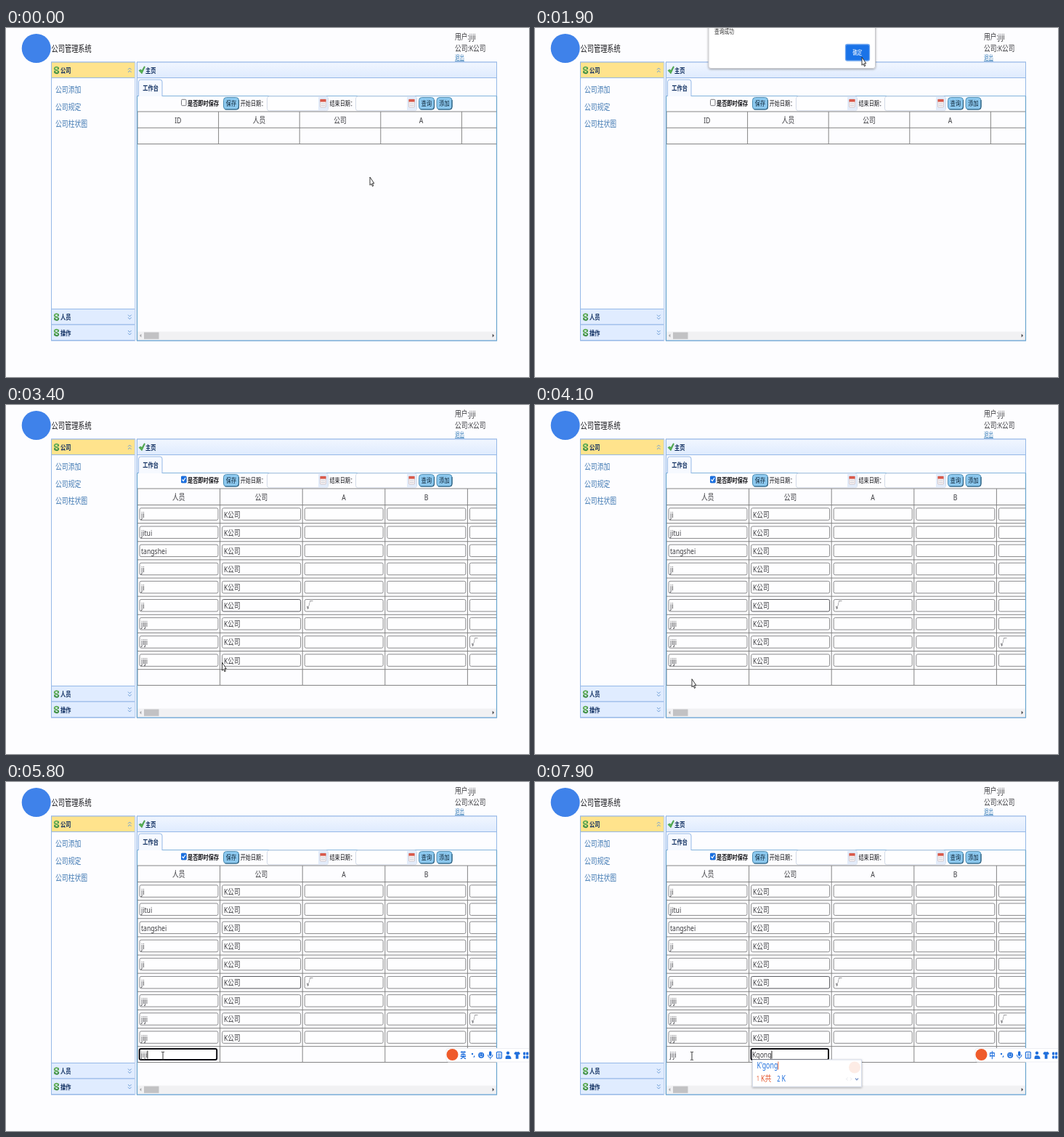
Animation, 720 px wide and 480 px high, one loop 8 s. Source, as an HTML page:

```html
<!DOCTYPE html>
<html lang="zh">
<head>
<meta charset="utf-8">
<style>
html, body { margin: 0; width: 100%; height: 100%; overflow: hidden; background: #fdfdff; }
svg { display: block; width: 720px; height: 480px; }
text { font-family: "Noto Sans", "Noto Sans CJK SC", sans-serif; white-space: pre; }
</style>
</head>
<body>
<svg id="stage" viewBox="0 0 720 480" xmlns="http://www.w3.org/2000/svg"></svg>
<script>
const LOOP = 8000;
const SQUEEZE = 0.75;
const INK = '#3c3c40', BLUE = '#1f6fdc', EDGE = '#95b8e7', LINE = '#858585';

const rect = (x, y, w, h, fill, stroke = 'none', more = '') =>
  `<rect x="${x}" y="${y}" width="${w}" height="${h}" fill="${fill}" stroke="${stroke}" ${more}/>`;
const path = (d, stroke, width = 1, fill = 'none', more = '') =>
  `<path d="${d}" stroke="${stroke}" stroke-width="${width}" fill="${fill}" ${more}/>`;
const group = (id, body, more = '') => `<g id="${id}" ${more}>${body}</g>`;
const circle = (x, y, r, fill) => `<circle cx="${x}" cy="${y}" r="${r}" fill="${fill}"/>`;

// y is the middle of the line of text
const text = (x, y, s, size, fill = INK, more = '') =>
  `<text transform="translate(${x} ${y + size * 0.37}) scale(${SQUEEZE} 1)" font-size="${size}" fill="${fill}" ${more}>${s}</text>`;
const bold = (x, y, s, size, fill) => text(x, y, s, size, fill, 'font-weight="700"');
const centred = (x, y, s, size, fill) => text(x, y, s, size, fill, 'text-anchor="middle"');

function chevrons(x, y, dir) {
  const one = dy => `M${x - 2.3} ${y + dy + 1.2 * dir}l2.3 ${-2.4 * dir}l2.3 ${2.4 * dir}`;
  return path(one(-1.8) + one(1.8), '#6f9fd8', 1);
}

function cycleIcon(x, y) {
  return path(`M${x + 2.8} ${y - 2.6}C${x} ${y - 6} ${x - 4} ${y - 3} ${x - 2.4} ${y - 1}L${x + 2.4} ${y + 1.6}`, '#5cab52', 1.9) +
    path(`M${x - 2.8} ${y + 2.6}C${x} ${y + 6} ${x + 4} ${y + 4} ${x + 2.4} ${y + 1.4}`, '#3f8f45', 1.9) +
    path(`M${x + 3.4} ${y - 4.4}v3.6h-3z M${x - 3.4} ${y + 4.6}v-3.6h3z`, 'none', 0, '#4b9a4b');
}

function sideHead(y, label, open) {
  return rect(62.5, y, 115, 21.5, open ? '#ffe38c' : '#e0ecff', EDGE) +
    cycleIcon(69.5, y + 10.8) + bold(75, y + 11, label, 9.6, '#0e2d5f') +
    chevrons(170.3, y + 11, open ? 1 : -1);
}

function button(x, label) {
  return rect(x, 95.5, 21, 16.5, '#8cc8ee', '#4f8fb5', 'rx="4"') +
    path(`M${x + 2} 112h15.5q3.5 0 3.5 -4v-9`, '#2d5f7e', 1.2) +
    centred(x + 10.4, 103.8, label, 9.5, '#10283c');
}

function dateBox(x) {
  return rect(x, 94, 84, 19.8, '#fefeff', '#d3dbe8', 'rx="3"') +
    rect(x + 70.5, 94.5, 13, 18.8, '#e3ecfa') +
    rect(x + 73, 98, 8, 11, '#f7f3f4', '#c9b9bd', 'stroke-width=".7" rx="1"') +
    rect(x + 73, 98, 8, 3.6, '#d9594a') +
    path(`M${x + 74.5} 104h5M${x + 74.5} 106.5h5`, '#b9bcc8', 1, 'none', 'stroke-dasharray="1.2 .7"');
}

function grid(xs, ys, heads) {
  const left = xs[0], bottom = ys[ys.length - 1];
  const d = ys.map(y => `M${left} ${y}H676`).join('') + xs.map(x => `M${x} 115V${bottom}`).join('');
  const step = xs[1] - xs[0];
  return path(d, LINE) + heads.map((h, i) => centred(left + step * (i + 0.5), 126.7, h, 11.6)).join('');
}

const field = (x, y, stroke = '#8a8a8c') => rect(x, y, 108, 16.5, '#fefeff', stroke, 'rx="2"');
const focusBox = x => rect(x, 367, 106.5, 15, '#fff', '#0d0d12', 'stroke-width="2" rx="2"');

const people = ['ji', 'jitui', 'tangshei', 'ji', 'ji', 'ji', 'jiji', 'jiji', 'jiji'];
const COL = 113.6, ROW = 25.13;

function fullTable() {
  const ys = [115, ...Array.from({ length: 10 }, (_, i) => 137.5 + i * ROW), 385.5];
  const xs = [0, 1, 2, 3, 4].map(i => 181 + i * COL);
  let out = grid(xs, ys, ['人员', '公司', 'A', 'B']);
  people.forEach((name, r) => {
    const y = 141.8 + r * ROW, mid = y + 8.5;
    for (let c = 0; c < 5; c++) out += field(184 + c * COL, y, r === 5 && c === 1 ? '#55555a' : undefined);
    out += text(186, mid, name, 11.5) + text(300, mid, 'K公司', 11.5);
    if (r === 5) out += text(413.5, mid, '√', 12);
    if (r === 7) out += text(640.5, mid, '√', 12);
  });
  return out;
}

function inputBar() {
  const icons =
    circle(642, 374, 1.2, BLUE) + path('M645 376.5l-1 2.2', BLUE, 1.3) +
    circle(654.2, 375.7, 4, BLUE) + path('M652 376.4q2.2 3 4.4 0', '#fff', 1) +
    circle(652.8, 374.2, 0.7, '#fff') + circle(655.6, 374.2, 0.7, '#fff') +
    rect(665, 370.3, 3.4, 6.6, BLUE, 'none', 'rx="1.7"') +
    path('M663.4 375q0 4 3.3 4t3.3 -4M666.7 379v2.4', BLUE, 1) +
    rect(675.4, 371.3, 7, 8.8, 'none', BLUE, 'stroke-width="1.2" rx="1"') +
    path('M677 374h4M677 376h4M677 378.2h4', BLUE, 0.9) +
    circle(691, 372.8, 2.2, BLUE) + path('M687.6 381v-2q0 -3 3.4 -3t4.4 3v2z', 'none', 0, BLUE) +
    path('M699.3 373l2.6 -2.3q1.7 1.6 3.4 0l2.6 2.3l-1.4 2.2l-1 -.6v6.2h-3.8v-6.2l-1 .6z', 'none', 0, BLUE) +
    [712, 716].map(x => [371.5, 376.4].map(y => rect(x, y, 3.2, 4, BLUE, 'none', 'rx="1"')).join('')).join('');
  return rect(606, 366.5, 116, 18.5, '#fff', '#eceef3', 'rx="3"') + circle(614.5, 375, 8, '#ef5b2b') +
    `<g id="mode">${text(625.3, 375.7, '中', 11, BLUE, 'font-weight="700"')}</g>` + icons;
}

const shadow = 'filter="url(#soft)"';
const stage = document.getElementById('stage');
stage.innerHTML = `
<defs>
  <linearGradient id="head" x2="0" y2="1"><stop stop-color="#f1f6ff"/><stop offset="1" stop-color="#dfebfe"/></linearGradient>
  <filter id="soft" x="-10%" y="-20%" width="120%" height="150%"><feDropShadow dx="0" dy="1" stdDeviation="1.5" flood-opacity=".35"/></filter>
  <clipPath id="pane"><rect x="180" y="93" width="495.5" height="324"/></clipPath>
</defs>` +
  rect(0, 0, 720, 480, '#fdfdff') +
  circle(41.7, 28, 20, '#3f82ea') +
  text(62.5, 28.7, '公司管理系统', 12.3, '#1c1c20', 'font-weight="500"') +
  text(618, 12, '用户:jiji', 11.6) + text(618, 27.8, '公司:K公司', 11.6) +
  text(618, 41, '退出', 8.6, '#337ab7') + path('M618 45.5h13', '#337ab7', 0.7) +
  rect(62.5, 47, 115, 383, '#fdfdff', EDGE) +
  sideHead(47, '公司', true) + sideHead(386.5, '人员') + sideHead(408, '操作') +
  ['公司添加', '公司规定', '公司柱状图'].map((s, i) => text(68, 84.5 + i * 23.8, s, 11.8, '#4179b3')).join('') +
  rect(177.5, 47, 3, 383, '#e6eefb') +
  rect(180.5, 47, 495, 383, '#fdfdff', EDGE) +
  rect(180.5, 47, 495, 21.5, 'url(#head)', EDGE) +
  path('M183 58.5l2.6 -1.5l1.2 2l3.6 -6.2l1 .6l-4.4 9.4z', '#3c9440', 0.7, '#58b34f') +
  bold(192, 58, '主页', 9.6, '#0e2d5f') +
  path('M181 93.5H675', '#82b4dc', 1) +
  path('M182.5 94V74q0 -3 3 -3h26.500q3 0 3 3v20', EDGE, 1, '#f6f9ff') +
  bold(188.3, 82, '工作台', 9.6, '#0e2d5f') +
  rect(241.5, 98.300, 6.5, 8.4, '#fff', '#77777c', 'rx="1.2"') +
  group('tick', rect(241, 97.8, 7.5, 9.4, '#1a6fe0', 'none', 'rx="1.2"') + path('M242.5 102.5l1.700 2l2.800 -4.500', '#fff', 1.2)) +
  bold(250, 103.5, '是否即时保存', 9.6, '#17171b') +
  button(299.5, '保存') + text(322.7, 103.5, '开始日期：', 9.5, '#17171b') + dateBox(359.5) +
  text(445.5, 103.5, '结束日期：', 9.5, '#17171b') + dateBox(481.5) +
  button(568.5, '查询') + button(593, '添加') +
  group('empty', grid([0, 1, 2, 3, 4].map(i => 181 + i * 111.6), [115, 137.300, 159.500], ['ID', '人员', '公司', 'A']), 'clip-path="url(#pane)"') +
  group('full', fullTable(), 'clip-path="url(#pane)"') +
  rect(181, 417.5, 494.5, 11.5, '#f1f1f3') + rect(190, 418.5, 20.500, 9.300, '#c2c2c4') +
  path('M186.300 420.800v4.600l-2.300 -2.300z', 'none', 0, '#a5a5a8') +
  path('M669.700 420.800v4.600l2.300 -2.300z', 'none', 0, '#404044') +
  path('M180.5 93.500V430H675.5V93.500', '#69a5ce', 1.200) +
  group('box1', focusBox(183.7)) + group('box2', focusBox(297.5)) +
  group('name', '') + group('firm', '') +
  group('caret', path('M0 369.5v11', '#111', 0.9)) +
  group('hint', rect(183.5, 386.5, 106.5, 32.500, '#fff', 'none', shadow) + text(190, 400.800, '人员1', 9.3, '#222')) +
  group('bar', inputBar()) +
  group('ime', rect(299.5, 382, 150, 37, '#fff', '#d5dcea', shadow) + circle(440, 392.5, 8, '#fdece5') +
    path('M430.500 406.500l-2 2l2 2M434 406.500l2 2l-2 2', '#e3e5ea', 0.9) +
    path('M441 407.500l2 2.300l2 -2.300', '#7795c9', 1.2) + '<g id="words"></g>') +
  group('alert', rect(239, -10, 229.500, 65.500, '#fff', '#c8c8cc', 'rx="3" ' + shadow) +
    text(247, 5, '查询成功', 9, '#333') +
    rect(427.500, 22.500, 33, 22.500, '#1a73e8', '#6fa6ef', 'rx="2.500" stroke-width="1.300"') +
    centred(443.800, 34, '确定', 8.8, '#fff')) +
  group('arrow', path('M0 0V11.200L2 9.300L3.500 12.800L4.800 12L3.400 8.700H5.800Z', '#222', 0.9, '#fff')) +
  group('hand', path('M0 .8q.8 -1.300 1.600 0v5l3.600 1q1.200 .6 1 2.200l-.7 5h-4.200l-2.600 -4.600q-.6 -1.800 .6 -1.200l.7 .8z', '#222', 0.9, '#fff')) +
  group('beam', path('M-2 -5.500h1.500l.5 .5l.5 -.5h1.500M0 -5v10M-2 5.500h1.500l.5 -.5l.5 .5h1.500', '#222', 0.9));

const $ = id => document.getElementById(id);
const show = (id, on) => $(id).setAttribute('visibility', on ? 'visible' : 'hidden');
const place = (id, x, y) => $(id).setAttribute('transform', `translate(${x} ${y})`);
function fill(id, html) {
  const el = $(id);
  if (el.seen !== html) el.innerHTML = el.seen = html;
}

// [time, x, y]
const moves = [[0, 501, 205], [100, 501, 205], [900, 574.5, 105.5], [1300, 574.5, 105.5], [1800, 450, 40],
  [2050, 450, 40], [2650, 244.5, 102], [2900, 244.5, 102], [3400, 297.5, 354], [3600, 297.5, 354], [4100, 216, 376.800], [LOOP, 216, 376.800]];

function pointer(t) {
  const i = moves.findIndex((m, k) => k && t <= m[0]);
  const [t0, x0, y0] = moves[i - 1], [t1, x1, y1] = moves[i];
  const p = (t - t0) / (t1 - t0), e = p * p * (3 - 2 * p);
  return [x0 + (x1 - x0) * e, y0 + (y1 - y0) * e];
}

const FILLED = 2100, CHECKED = 2800, FOCUS = 4200, ENGLISH = 5100, NEXT = 6200, CHINESE = 6400;
const nameKeys = [5200, 5300, 5500, 5600];
const firmKeys = [6900, 7100, 7200, 7400, 7500];
const choices = ['K', 'K个', 'K狗', 'K共', 'K共'];
const typed = (keys, t) => keys.filter(k => t >= k).length;

function cursorKind(x, y, t) {
  if (y > 95 && y < 112 && x > 568 && x < 614) return 'hand';
  if (t >= FOCUS) return 'beam';
  const cx = (x - 184) % COL, cy = (y - 141.8) % ROW;
  const inField = t >= FILLED && x > 184 && cx < 108 && y > 141.8 && y < 360 && cy < 16.5;
  return inField ? 'beam' : 'arrow';
}

function render(t) {
  const filled = t >= FILLED, n = typed(nameKeys, t), m = typed(firmKeys, t), second = t >= NEXT;
  show('empty', !filled);
  show('full', filled);
  show('tick', t >= CHECKED);
  show('alert', t >= 1300 && t < FILLED);
  show('box1', t >= FOCUS && !second);
  show('box2', second);
  show('hint', t >= 4500 && n === 0);
  show('bar', t >= FOCUS);
  fill('mode', text(625.3, 375.7, t >= ENGLISH && t < CHINESE ? '英' : '中', 11, BLUE, 'font-weight="700"'));
  fill('name', n ? text(185.5, 374.8, 'jiji'.slice(0, n), 11.5) : '');
  const word = 'Kgong'.slice(0, m), spelled = m > 1 ? "K'" + word.slice(1) : word;
  fill('firm', m ? text(299, 374.8, word, 11.5) : '');

  // the caret stays solid just after each key
  const last = [FOCUS, ...nameKeys, NEXT, ...firmKeys].filter(k => k <= t).pop();
  show('caret', t >= FOCUS && (t - last) % 1060 < 530);
  const caretAt = second ? 299.5 : 186;
  const ink = $(second ? 'firm' : 'name').querySelector('text');
  place('caret', caretAt + (ink ? ink.getComputedTextLength() * SQUEEZE : 0), 0);

  show('ime', m > 0);
  if (m) {
    const red = '#e4572e', pick = choices[m - 1];
    fill('words', text(305.5, 390, spelled, 11.8, BLUE) + text(305, 408, '1', 9, red) + text(311, 408, pick, 11.8, red) +
      (m > 1 ? text(333.300, 408, '2', 10, BLUE) + text(339.500, 408, 'K', 11.8, BLUE) : '') +
      '<path id="mark" d="M.5 384.500v11" stroke="#e4572e" stroke-width=".9"/>');
    place('mark', 305.5 + $('words').firstChild.getComputedTextLength() * SQUEEZE, 0);
  }

  const [x, y] = pointer(t), kind = cursorKind(x, y, t);
  for (const k of ['arrow', 'hand', 'beam']) {
    show(k, k === kind);
    place(k, x, y);
  }
}

const start = performance.now();
function tick() {
  render((performance.now() - start) % LOOP);
  requestAnimationFrame(tick);
}
tick();
</script>
</body>
</html>
```
